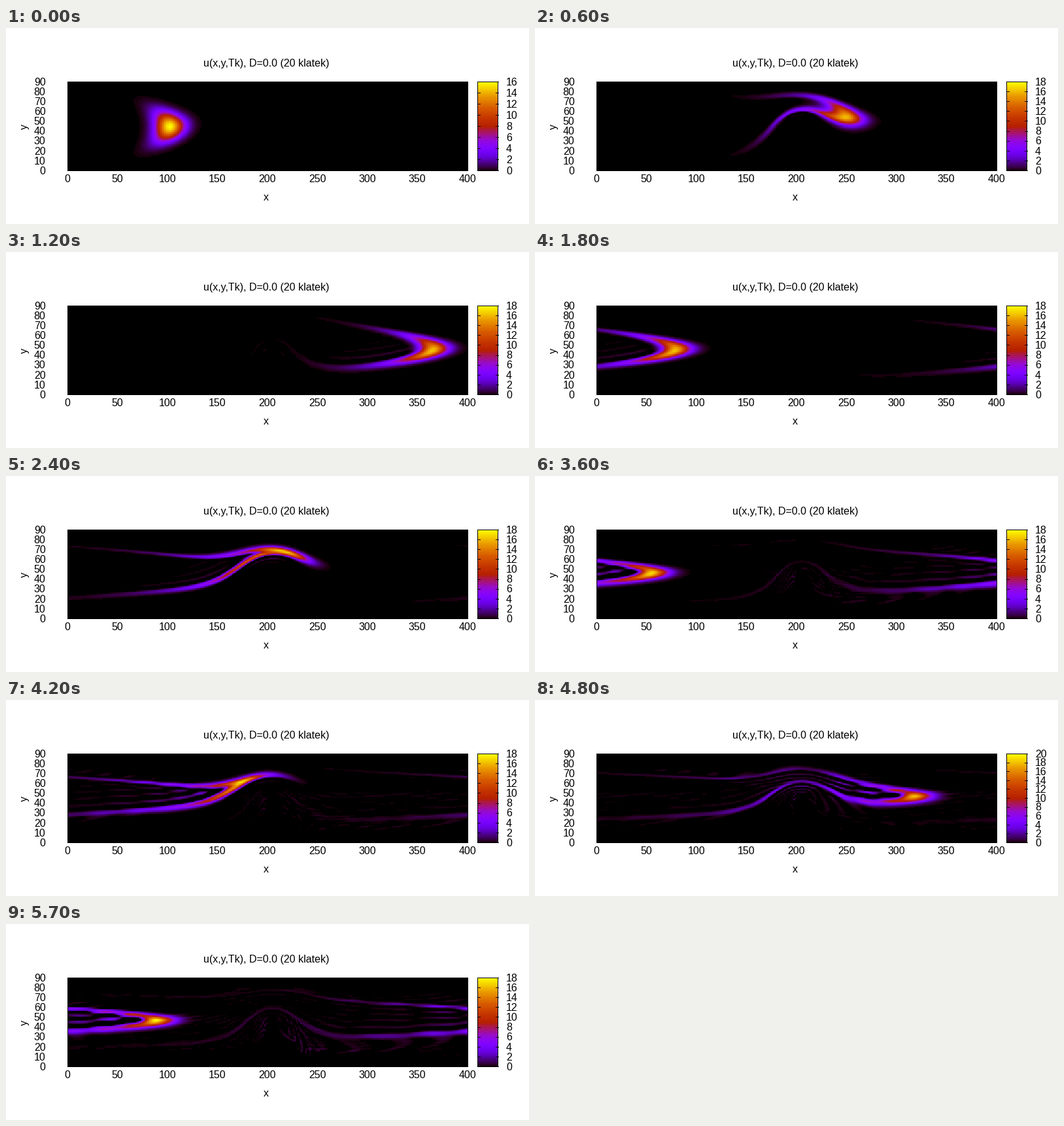
Recreate the animation shown at these times as a matplotlib script. Size 800x300 px, loop 6000 ms.

```python
import numpy as np
import matplotlib.pyplot as plt
from matplotlib.animation import FuncAnimation
from matplotlib.colors import ListedColormap
from matplotlib.patches import Rectangle

W, H, DPI = 800, 300, 100
NX, NY = 400, 90                 # grid cells of the channel
I1, I2, J1 = 200, 210, 50        # obstacle columns and its top row
FRAMES, INTERVAL = 20, 300
STEPS = 250                      # time steps per frame
SHIFT = 57.6                     # cells travelled on the axis per frame
TOPS = [16] * 2 + [18] * 13 + [20] * 4 + [18]


def stream_function():
    """Creeping flow over the obstacle, solved column by column."""
    n = NY - 1
    s = np.arange(1, NY) / NY
    ends = np.concatenate([3 * s**2 - 2 * s**3, (6 - 12 * s) / NY**2])

    eye = np.eye(n)
    lap = np.eye(n, k=1) + np.eye(n, k=-1) - 4 * eye
    mid = np.block([[lap, -eye], [np.zeros((n, n)), lap]])
    mid[n, 0] += 2
    mid[-1, n - 1] += 2
    side = np.eye(2 * n)
    rhs = np.zeros(2 * n)
    rhs[n - 1], rhs[-1] = -1, 2

    solid = np.concatenate([np.arange(J1), n + np.arange(J1)])
    face = np.arange(J1 - 1)
    edge = n + J1 - 1

    def blocks(i):
        if not I1 <= i <= I2:
            return side, mid, side
        a, b, c = side.copy(), mid.copy(), side.copy()
        for m in (a, b, c):
            m[solid] = 0
        b[solid, solid] = 1
        if I1 < i < I2:
            b[edge, J1] = -2
        else:
            near = a if i == I1 else c
            near[n + face, face] = -2
            near[edge, J1 - 1] = -1
            b[edge, J1] = -1
        return a, b, c

    g, h = np.zeros((2 * n, 2 * n)), ends
    gs, hs = [], []
    for i in range(1, NX):
        a, b, c = blocks(i)
        sol = np.linalg.solve(b - a @ g, np.column_stack([c, rhs - a @ h]))
        g, h = sol[:, :-1], sol[:, -1]
        gs.append(g)
        hs.append(h)

    psi = np.zeros((NY + 1, NX + 1))
    psi[NY] = 1
    psi[1:NY, 0] = psi[1:NY, NX] = ends[:n]
    x = ends
    for i in range(NX - 1, 0, -1):
        x = hs[i - 1] - gs[i - 1] @ x
        psi[1:NY, i] = x[:n]
    return psi


def velocity(psi):
    vx, vy = np.zeros_like(psi), np.zeros_like(psi)
    vx[1:-1] = (psi[2:] - psi[:-2]) / 2
    vy[:, 1:-1] = (psi[:, :-2] - psi[:, 2:]) / 2
    for v in (vx, vy):
        v[:J1 + 1, I1:I2 + 1] = 0
    vx[:, 0], vx[:, -1] = vx[:, 1], vx[:, -2]
    return vx[1:-1], vy[1:-1]


def advect():
    """Density fields, one per frame; periodic along x."""
    vx, vy = velocity(stream_function())
    dt = SHIFT / (1.5 / NY) / STEPS
    coef = [((dt / 2 / k * vx).astype(np.float32),
             (dt / 2 / k * vy).astype(np.float32)) for k in (4, 3, 2, 1)]
    y, x = np.mgrid[0:NY + 1, -1:NX + 2]
    peak = 1 / (2 * np.pi * 0.1**2)
    u = (peak * np.exp(-((x - 45)**2 + (y - 45)**2) / 200)).astype(np.float32)

    fields = []
    for _ in range(FRAMES):
        for _ in range(STEPS):
            w = u.copy()
            for cx, cy in coef:
                w[:, 0], w[:, -1] = w[:, -2], w[:, 1]
                w[1:-1, 1:-1] = (u[1:-1, 1:-1]
                                 - cx * (w[1:-1, 2:] - w[1:-1, :-2])
                                 - cy * (w[2:, 1:-1] - w[:-2, 1:-1]))
            u = w
        p = u[:, 1:-1]
        fields.append((p[1:, 1:] + p[1:, :-1] + p[:-1, 1:] + p[:-1, :-1]) / 4)
    return fields


fields = advect()

t = np.linspace(0, 1, 128)
cmap = ListedColormap(np.column_stack(
    [np.sqrt(t), t**3, np.clip(np.sin(2 * np.pi * t), 0, 1)]))

plt.rcParams['font.family'] = 'Liberation Sans'
plt.rcParams['font.size'] = 16 * 72 / DPI
PX = 72 / DPI
L, R, T, B = 94, 706, 82, 218    # border pixels of the plot
CL, CR = 721, 752                # and of the colour bar
DROP = 5.8                       # from a tick to its label's baseline

fig = plt.figure(figsize=(W / DPI, H / DPI), dpi=DPI, facecolor='white')
ax = fig.add_axes([0, 0, 1, 1])
ax.axis('off')


def picture(data, left, right):
    return ax.imshow(data, cmap=cmap, origin='lower', aspect='auto',
                     extent=(left, right, B + 1, T + 1),
                     interpolation='nearest', zorder=1)


def box(left, right, **kw):
    ax.add_patch(Rectangle((left, T), right - left, B - T, edgecolor='black',
                           linewidth=PX, antialiased=False, **kw))


def label(x, y, s, ha='center', **kw):
    return ax.text(x, y, s, ha=ha, va='baseline', color='black', **kw)


def level(frac):
    return B + (T - B) * frac


box(L, R, facecolor='black', zorder=0)
heat = picture(fields[0], L, R)
picture(t[:, None], CL, CR).set_clim(0, 1)
box(L, R, fill=False, zorder=2)
box(CL, CR, fill=False, zorder=2)
ax.set_xlim(0, W)
ax.set_ylim(H, 0)

label(398.5, 59.3, 'u(x,y,Tk), D=0.0 (20 klatek)')
label(398, 264, 'x')
label(33, 151, 'y', rotation=90, rotation_mode='anchor')
for v in range(0, NX + 1, 50):
    label(L + (R - L) * v / NX - 0.4, 236.3, str(v))
for v in range(0, NY + 1, 10):
    label(60.5, level(v / NY) + DROP, str(v), ha='right')

scale = [label(765, 0, str(v), ha='left') for v in range(0, 21, 2)]
ticks = ax.hlines([], [], [], colors='black', linewidth=PX,
                  antialiased=False, zorder=3)


def update(k):
    top = TOPS[k]
    heat.set_data(fields[k])
    heat.set_clim(0, top)
    segs = []
    for i, txt in enumerate(scale):
        y = level(2 * i / top)
        txt.set_visible(2 * i <= top)
        txt.set_y(y + DROP)
        if 2 * i <= top:
            segs += [[(CL, y), (CL + 4, y)], [(CR - 3, y), (CR + 1, y)]]
    ticks.set_segments(segs)
    return [heat, ticks, *scale]


anim = FuncAnimation(fig, update, frames=FRAMES, interval=INTERVAL,
                     repeat=True, repeat_delay=0, init_func=lambda: update(0))
plt.show()
```
